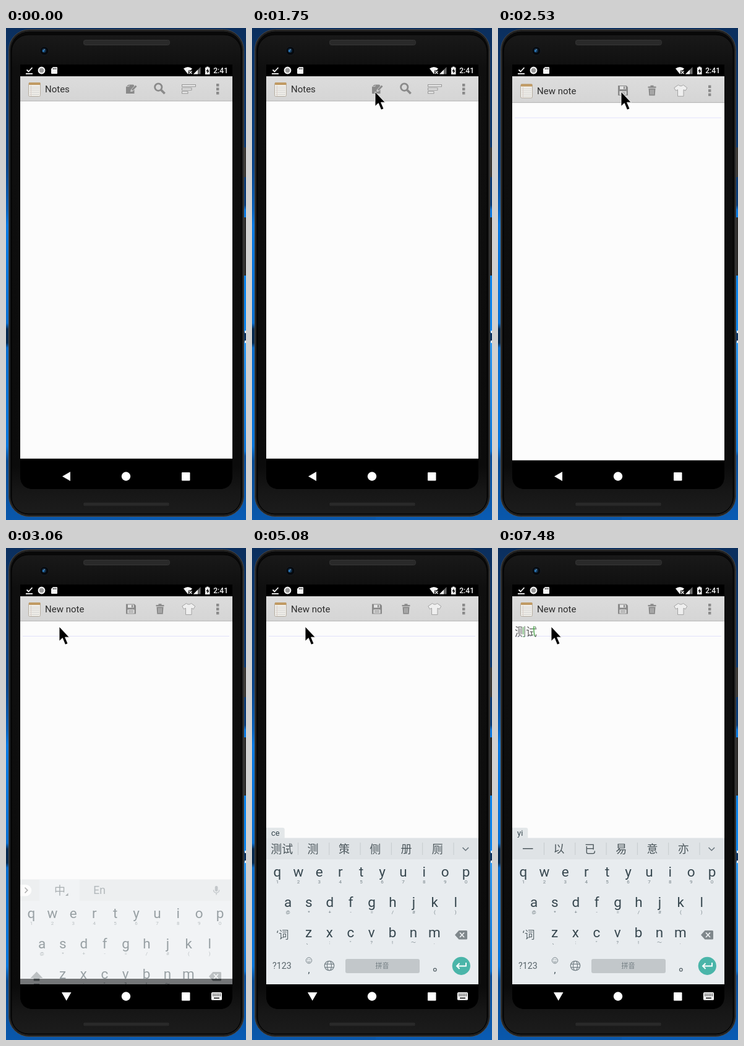
These frames come from a looping animation (388 by 795 pixels, 8 s). An HTML page:

```html
<!DOCTYPE html>
<html lang="zh-CN">
<head>
<meta charset="utf-8">
<title>Notes</title>
<style>
html, body { margin: 0; width: 100%; height: 100%; overflow: hidden; background: #0b2c58; }
svg { display: block; width: 388px; height: 795px; }
text { font-family: Roboto, "Noto Sans CJK SC", "Noto Sans CJK JP", "Noto Sans CJK", sans-serif; white-space: pre; }
.mid { text-anchor: middle; }
</style>
</head>
<body>
<svg id="stage" viewBox="0 0 388 795" xmlns="http://www.w3.org/2000/svg"></svg>
<script>
const LOOP = 8000;
const GREY = '#8a8a8a', INK = '#37474f', SOFT = '#78848a';

// Markup helpers
const rect = (x, y, w, h, fill, more = '') =>
  `<rect x="${x}" y="${y}" width="${w}" height="${h}" fill="${fill}" ${more}/>`;
const circle = (x, y, r, fill, more = '') =>
  `<circle cx="${x}" cy="${y}" r="${r}" fill="${fill}" ${more}/>`;
const path = (d, fill, more = '') => `<path d="${d}" fill="${fill}" ${more}/>`;
const line = (d, color, width = 1, more = '') =>
  path(d, 'none', `stroke="${color}" stroke-width="${width}" ${more}`);
const text = (x, y, size, fill, str, more = '') =>
  `<text x="${x}" y="${y}" font-size="${size}" fill="${fill}" ${more}>${str}</text>`;
const mid = (x, y, size, fill, str) => text(x, y, size, fill, str, 'class="mid"');
const group = (id, body, more = '') => `<g id="${id}" ${more}>${body}</g>`;
const gradient = (id, stops, more) => `<linearGradient id="${id}" ${more}>` +
  stops.map(([o, c]) => `<stop offset="${o}" stop-color="${c}"/>`).join('') + '</linearGradient>';

function defs() {
  const down = 'x1="0" y1="0" x2="0" y2="1"';
  return '<defs>' +
    gradient('deskL', [[0, '#0b2f5e'], [.28, '#0a4488'], [.37, '#0a63bd'], [.4, '#0a7be4'], [.6, '#0a70d2'],
      [.612, '#06294f'], [.64, '#06294f'], [.65, '#0a6ccb'], [.85, '#0a78de'], [.88, '#084a92'], [1, '#0a58ac']], down) +
    gradient('deskR', [[0, '#0b2f5e'], [.36, '#0a3a74'], [.37, '#0a78e0'], [.5, '#0a84ee'], [.615, '#0a84ee'],
      [.62, '#082f5c'], [.635, '#082f5c'], [.64, '#2b97f2'], [.86, '#0a74d6'], [.87, '#0a4c96'], [1, '#0a5cb4']], down) +
    gradient('body', [[0, '#191919'], [.07, '#0f0f0f'], [.9, '#0b0b0b'], [.95, '#161616'], [1, '#1c1c1c']], down) +
    gradient('bar', [[0, '#dcdcdc'], [1, '#d5d5d5']], down) +
    gradient('note', [[.32, '#5c5c5c'], [.36, '#44a044'], [.42, '#44a044'], [.46, '#5c5c5c'],
      [.78, '#5c5c5c'], [.83, '#44a044'], [.9, '#44a044'], [.94, '#5c5c5c']],
      'gradientUnits="userSpaceOnUse" x1="27" x2="63" y1="0" y2="0"') +
    `<pattern id="mesh" width="2" height="2" patternUnits="userSpaceOnUse">${rect(0, 0, 2, 2, '#111')}${rect(0, 0, 1, 1, '#4a4a4a')}${rect(1, 1, 1, 1, '#3a3a3a')}</pattern>` +
    `<clipPath id="app">${rect(23, 78, 343, 627, '#000')}</clipPath></defs>`;
}

function phone() {
  return rect(0, 0, 200, 795, 'url(#deskL)') + rect(200, 0, 188, 795, 'url(#deskR)') +
    rect(384, 193, 4, 48, '#3a3835') + rect(384, 306, 4, 94, '#2b2a29') +
    rect(386, 489, 2, 4, '#dfeaf5') + rect(386, 505, 2, 4, '#dfeaf5') +
    rect(4.5, 2.5, 380, 787, '#1d1d1d', 'rx="33" stroke="#4b4947"') +
    rect(6.5, 5, 376, 782, '#090909', 'rx="31" stroke="#2a2a2a"') +
    rect(9, 11, 371, 774, 'url(#body)', 'rx="27" stroke="#020202"') +
    rect(125.5, 19.5, 139, 8, 'url(#mesh)', 'rx="3" stroke="#333"') +
    rect(125.5, 767, 138, 5, 'url(#mesh)', 'rx="2" stroke="#222"') +
    circle(62, 37, 7, '#07090c', 'stroke="#191b1f"') + circle(61.5, 36.5, 3.4, '#12304e') +
    circle(60.5, 37, 1.7, '#2d78b6') + circle(62, 35, .8, '#9ac4e4') +
    path('M23 59H366V723Q366 745 344 745H45Q23 745 23 723Z', '#000');
}

function statusBar() {
  const w = '#f4f4f4';
  return line('M33.5 67.5l3 3 6-6.5', w, 1.8) + rect(32, 73, 11, 1.8, w) +
    circle(57.5, 68.5, 4.8, '#999', `stroke="${w}" stroke-width="2.2"`) +
    path('M76 63h6q1 0 1 1v9q0 1-1 1h-8q-1 0-1-1v-7z', w) +
    line('M76.5 64.5v2.5M78.7 64.5v2.5M80.9 64.5v2.5', '#222') +
    path('M287 65.5Q294 60.5 301 65.5L294 74.5Z', w) + rect(295, 68.5, 7, 7, '#000') +
    line('M296 69.5l4.5 4.5M300.5 69.5l-4.5 4.5', w, 1.4) +
    path('M303 74.5L314.5 63V74.5Z', '#6b6b6b') + path('M303 74.5l7-7v7z', w) +
    path('M324 62.5h3.5v1.3h2V75h-7.5V63.8h2z', w) + path('M326.5 65.5l-3 4.6h2v3.4l3-4.8h-2z', '#000') +
    text(335.2, 73, 12.1, w, '2:41', 'font-weight="500"');
}

function toolbar(title, icons) {
  const notepad = rect(36.5, 88.5, 19, 22, '#f1efea', 'rx="2" stroke="#b4aca0"') +
    rect(37, 88, 18.5, 4, '#c09a63', 'rx="1"') +
    line('M38 95.5h16M38 98.5h16M38 101.5h16M38 104.5h16M38 107.5h16', '#d2d2d0') + line('M40.5 93v17', '#dccfc8');
  const dots = [90, 96.5, 103].map(y => rect(340, y, 4.4, 4.4, GREY)).join('');
  return rect(23, 78, 343, 40, 'url(#bar)') + rect(23, 117.3, 343, 1.2, '#b9b9b9') +
    notepad + text(63, 104.3, 15, '#2c2c2c', title) + icons + dots;
}

function listPage() {
  const icons = path('M194 95l4-3.5h8l1.5 2-5.5 6-.8 3.5 3.6-.8 2.7-2.6V106H194Z', GREY) +
    path('M203 101l.7-2.6 5.8-6 2 2-5.8 6z', GREY) + line('M199 91.5v3h-4', '#ddd', .7) +
    circle(246.3, 95.6, 5.7, 'none', `stroke="${GREY}" stroke-width="2.8"`) +
    line('M250.6 100l6 6', GREY, 3.6) +
    [[91.5, 22], [97, 15.5], [102.5, 9.5]].map(([y, w]) => rect(284.5, y, w, 3.3, '#e8e8e8', 'stroke="#979797"')).join('');
  const item = text(27, 153, 18.3, '#333', '&lt;Untitled&gt;') +
    text(27, 184.5, 11.85, '#666', '2019.05.19 14:41:42') + rect(23, 188, 343, 1, '#ececec');
  return rect(23, 78, 343, 618, '#fcfcfc') + rect(23, 695, 343, 1, '#d0d0d0') +
    toolbar('Notes', icons) + group('item', item);
}

function editPage() {
  const icons = path('M194 90.5h13.5l2.5 2.5v13.5h-16z', GREY) + rect(197, 91.5, 9.5, 5, '#e4e4e4') + rect(203, 92, 2, 4, GREY) +
    rect(196.5, 99.5, 11, 6, '#e4e4e4') + line('M198 101.5h8M198 103.7h8', GREY) +
    path('M242.5 92h4v-1.7h5V92h4v2.2h-13zM243.5 95.2h11l-.8 11.6h-9.4z', GREY) +
    line('M246.8 97v8M249 97v8M251.2 97v8', '#cfcfcf', .9) +
    path('M291.5 89.5q4 3.4 8 0l6.2 4.6-2.6 4.6-3.1-1.5v10.5h-9.5V97.2l-3.1 1.5-2.6-4.6z', '#efefef', 'stroke="#a2a2a2" stroke-linejoin="round"');
  return rect(23, 78, 343, 618, '#fcfcfc') + toolbar('New note', icons) +
    rect(27, 142, 334, 1, '#e1e1fb') +
    group('typed', text(27, 142.3, 18, 'url(#note)', '测试')) + rect(27, 123, 1, 25, '#a5a5a5', 'id="caret"');
}

function keyRow(keys, hints, x0, y) {
  return [...keys].map((k, i) => {
    const x = x0 + i * 33.9;
    return mid(x, y, 22.5, INK, k) + mid(x, y + 11.3, 8, SOFT, hints[i]);
  }).join('');
}

function keyboard() {
  const modes = rect(54, 469, 65, 34, '#e8ecef') + path('M23 477h9a9.2 9.2 0 0 1 0 18.4h-9z', '#fff') +
    line('M30.5 481.8l4.3 4.3-4.3 4.3', '#666', 1.6) + mid(87, 492.8, 18, '#59656b', '中') +
    path('M96 495l4.5-4.5v4.5z', '#59656b') + mid(151, 492.3, 17.5, '#6b777c', 'En') +
    rect(337.8, 479, 4.6, 9, '#8b9499', 'rx="2.3"') + line('M335.5 485.5a4.6 4.6 0 0 0 9.2 0M340.1 490v3.5', '#8b9499', 1.4);
  const shift = path('M49.5 617.5l10 10.5h-5.2v4.5h-9.6V628h-5.2z', '#80888c') + rect(45, 637, 9, 1.8, '#80888c');
  const back = path('M334.5 618h12q1.500 0 1.500 1.500v11.500q0 1.500-1.500 1.500h-12l-6.500-7.200z', '#80888c') +
    line('M336 621.500l7 7.500M343 621.500l-7 7.500', '#eef1f3', 1.7);
  const smile = circle(92, 666.5, 4.7, 'none', `stroke="${SOFT}"`) + circle(90.3, 665.2, .8, SOFT) +
    circle(93.7, 665.2, .8, SOFT) + line('M89.4 668q2.600 2.800 5.200 0', SOFT);
  const globe = circle(125, 675, 7.7, 'none', `stroke="${SOFT}" stroke-width="1.3"`) +
    `<ellipse cx="125" cy="675" rx="3.5" ry="7.7" fill="none" stroke="${SOFT}" stroke-width="1.2"/>` +
    line('M118 672.3h14M118 677.7h14', SOFT, 1.2);
  const enter = circle(338.3, 675.3, 14.6, '#4ab5a9') +
    line('M346 670v5.500h-14.500M335.500 671l-4.500 4.500 4.500 4.500', '#fff', 1.9);
  return rect(23, 469, 343, 236, '#e8ecef') + rect(23, 469, 343, 34, '#dfe3e6') + rect(23, 468, 343, 1, '#eef0f1') +
    group('modes', modes) + group('picks', '') +
    keyRow('qwertyuiop', '1234567890', 41, 530.5) + keyRow('asdfghjkl', '@*+-=/#()', 58, 579.5) +
    keyRow('zxcvbnm', '、:"?!～.', 91.5, 629) +
    group('shift', shift) + group('word', mid(49.5, 631, 16.5, '#59656b', '‘词')) + back +
    text(33, 680, 14.3, '#59656b', '?123') + smile + mid(92, 686.5, 15, INK, ',') + globe +
    rect(151, 664, 120, 23, '#c2c7ca', 'rx="3"') + mid(210.5, 679.3, 11, '#727d82', '拼音') +
    circle(295.8, 681.5, 2.3, 'none', 'stroke="#59656b" stroke-width="1.3"') + enter;
}

function navBar() {
  const keys = [0, 1].map(r => [0, 1, 2, 3, 4, 5].map(c => rect(334 + c * 2.4, 720 + r * 2.7, 1.3, 1.5, '#000')).join('')).join('');
  return path('M23 705H366V723Q366 745 344 745H45Q23 745 23 723Z', '#000') +
    path('M91 724.5L104 717V732Z', '#fff', 'id="navBack"') +
    group('navHide', path('M90 718H105.500L97.700 731.500Z', '#fff') + rect(332, 718, 17, 12.5, '#fff', 'rx="1.5"') + keys + rect(336, 726.5, 9, 1.6, '#000')) +
    circle(194, 724.5, 7.2, '#fff') + rect(284, 718, 13.5, 13.5, '#fff', 'rx="1"');
}

function pointer() {
  return group('click', circle(0, 0, 14.4, 'none', 'stroke="#000" stroke-width="1.2"') +
    circle(0, 0, 13.2, 'none', 'stroke="#fff" stroke-width="1.2"')) +
    path('M0 0V23.500L5.300 18.600 9.700 29.300 14 27.500 9.600 17.200H16.300Z', '#000', 'stroke="#fff" stroke-width=".9"');
}

const stage = document.getElementById('stage');
stage.innerHTML = defs() + phone() + statusBar() +
  '<g clip-path="url(#app)">' + listPage() + group('edit', editPage()) +
  group('keys', keyboard()) + group('bubble', '') + '</g>' + navBar() + group('pointer', pointer());

const el = {};
stage.querySelectorAll('[id]').forEach(n => { el[n.id] = n; });
const show = (id, on) => el[id].setAttribute('display', on ? 'inline' : 'none');
const shiftY = (id, y) => el[id].setAttribute('transform', `translate(0 ${y.toFixed(2)})`);
const within = (t, a, b) => t >= a && t < b;
const clamp = v => Math.min(1, Math.max(0, v));

// Input method states: start, pinyin, candidates
const inputs = [
  [0, '', ''],
  [4470, 'c', '才 从 次 出 此 曾'],
  [5080, 'ce', '测试 测 策 侧 册 厕'],
  [5310, "ce's", '测试 厕所 测算 测速 侧身 策士'],
  [5850, '', '版 机 仪 结果 用例 环境'],
  [6930, 'y', '一 有 要 也 以 已'],
  [7320, 'yi', '一 以 已 易 意 亦']
];
// Caret: from, to, x
const carets = [[3450, 3840, 27], [4470, 4850, 27], [5310, 5850, 27], [5850, 6470, 63], [6930, 7400, 63]];
// Pointer moves: from, to, target, easing power
const moves = [[290, 1050, 205, 106, 1.6], [1200, 1350, 199, 103, 1], [2530, 2984, 86, 127, 1.8]];

let shown = null;
function setInput(state) {
  if (state === shown) return;
  shown = state;
  const [, pinyin, words] = state;
  const list = words ? words.split(' ') : [];
  el.picks.innerHTML = list.map((w, i) => mid(48.3 + i * 50.3, 492.5, 18, '#4b565b', w) +
    rect(74 + i * 50.3, 476, 1, 20, '#c6cbce')).join('') + (words ? line('M340.500 484l4.800 4.800 4.800-4.800', '#66727a', 1.5) : '');
  show('modes', !words);
  show('shift', !pinyin);
  show('word', !!pinyin);
  el.bubble.innerHTML = pinyin ? path('', '#e3e7e9') + text(31, 465, 13, '#37474f', pinyin) : '';
  if (pinyin) {
    const [bg, label] = el.bubble.children;
    const right = 39 + label.getComputedTextLength();
    bg.setAttribute('d', `M23 452H${right - 3}q3 0 3 3V469H23Z`);
  }
}

function draw(t) {
  // The screen was refreshed in steps of roughly 76 ms
  const tick = t < 3060 ? 2300 + Math.floor((t - 2300) / 76) * 76 : 3060 + Math.floor((t - 3060) / 80) * 80;

  show('item', t >= 2130);
  const p = clamp((tick - 2300) / 380);
  show('edit', t >= 2300);
  shiftY('edit', 40 * (1 - p) ** 3);
  el.edit.setAttribute('opacity', Math.min(1, .27 + 1.6 * p));

  const k = clamp((tick - 2900) / 320);
  show('keys', k > 0);
  shiftY('keys', 134 * (1 - k));
  el.keys.setAttribute('opacity', k);
  show('navBack', k === 0);
  show('navHide', k > 0);

  setInput(inputs.filter(s => s[0] <= t).pop());
  show('typed', t >= 5850);
  const caret = carets.find(c => within(t, c[0], c[1]));
  show('caret', !!caret);
  if (caret) el.caret.setAttribute('x', caret[2]);

  let x = 325, y = 754;
  for (const [from, to, tx, ty, power] of moves) {
    const q = clamp((from + Math.floor((t - from) / 76 + .01) * 76) / (to - from) - from / (to - from));
    const e = t >= to ? 1 : 1 - (1 - q) ** power;
    x += (tx - x) * e;
    y += (ty - y) * e;
  }
  show('pointer', t >= 290);
  el.pointer.setAttribute('transform', `translate(${Math.round(x)} ${Math.round(y)})`);
  show('click', within(t, 1580, 1750) || within(t, 3600, 3770));
}

const start = performance.now();
function frame() {
  draw((performance.now() - start) % LOOP);
  requestAnimationFrame(frame);
}
frame();
</script>
</body>
</html>
```
